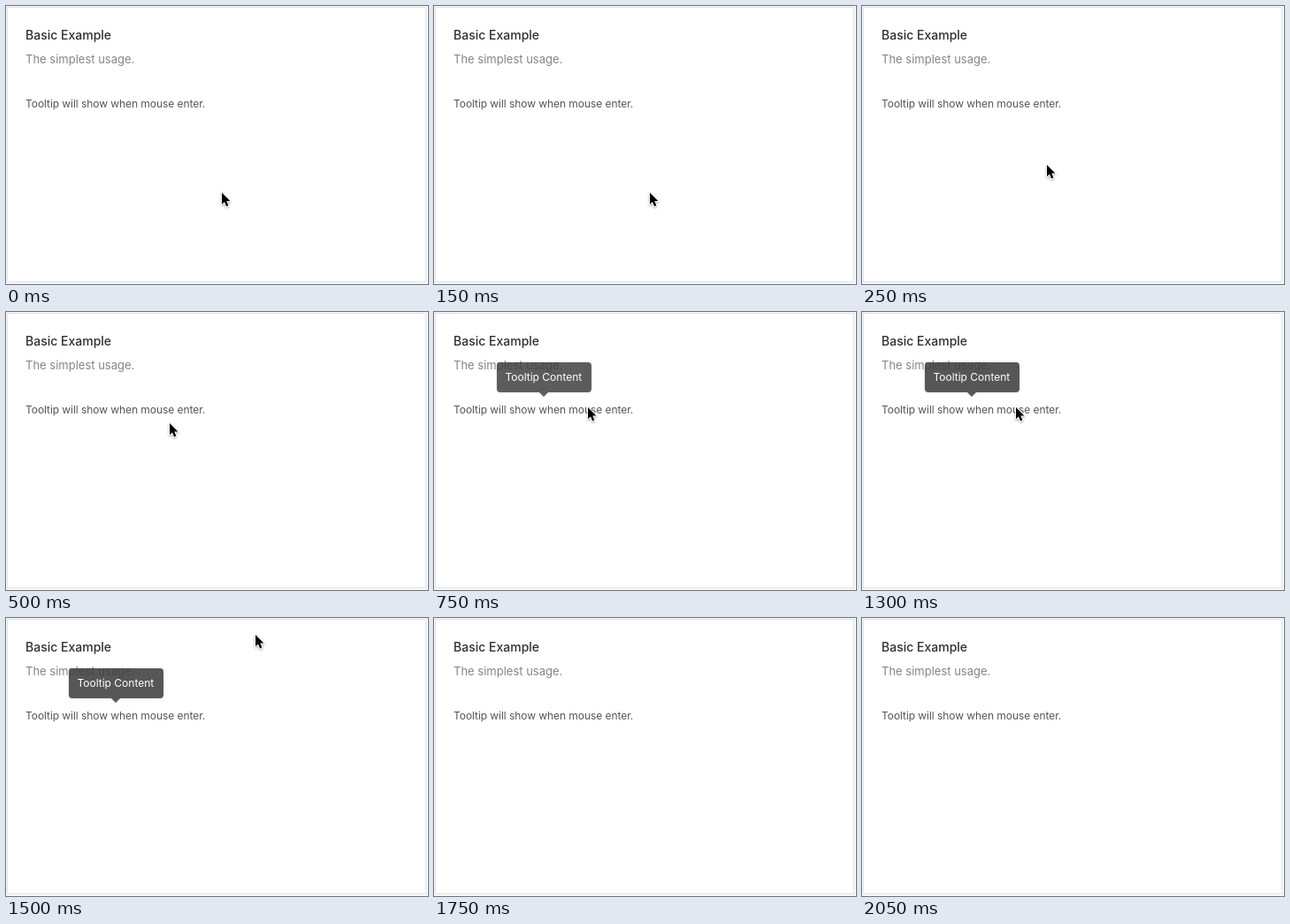
An HTML page for the animation above (2.25 s loop, 477 by 315 pixels).

```html
<!DOCTYPE html>
<html lang="en">
<head>
<meta charset="utf-8">
<title>Tooltip demo</title>
<style>
  html, body { margin: 0; width: 100%; height: 100%; overflow: hidden; background: #fff; }
  svg { display: block; width: 477px; height: 315px; }
  text { font-family: Inter, Roboto, "Liberation Sans", sans-serif; font-size: 12px; }
  .page { fill: #f9f9f9; }
  .card { fill: #fff; stroke: #e3e3e3; }
  .title { font-size: 14px; font-weight: 500; fill: #2e2e2e; }
  .sub { font-size: 13px; fill: #858585; }
  .body { fill: #555; letter-spacing: -0.06px; }
  .bubble { fill: rgba(64, 64, 64, .86); }
  .label { fill: #fff; }
  #tip { filter: drop-shadow(0 0 1.5px rgba(0, 0, 0, .17)); }
  #cursor { filter: drop-shadow(0 1px 1px rgba(0, 0, 0, .35)); }
  #cursor path { fill: #000; stroke: #fff; stroke-width: 2; stroke-linejoin: round; paint-order: stroke; }
</style>
</head>
<body>
<svg viewBox="0 0 477 315">
  <rect class="page" width="477" height="315"/>
  <rect class="card" x="1.5" y="1.5" width="473" height="311"/>
  <text class="title" x="22" y="38">Basic Example</text>
  <text class="sub" x="22" y="65">The simplest usage.</text>
  <text class="body" x="22" y="115">Tooltip will show when mouse enter.</text>
  <g id="tip">
    <path class="bubble" d="M75 57h99a4 4 0 0 1 4 4v26a4 4 0 0 1-4 4H129l-5 5-5-5H75a4 4 0 0 1-4-4V61a4 4 0 0 1 4-4z"/>
    <text class="label" x="80.5" y="78">Tooltip Content</text>
  </g>
  <g id="cursor"><path d="M0 0V13.3L3 10.5L5.1 15.6L7.4 14.6L5.3 9.6H9.4Z"/></g>
</svg>
<script>
  const LOOP = 2250;
  // at: ms, pos: cursor tip (null = hidden), tip: tooltip opacity
  const steps = [
    { at: 0, pos: [244, 211.5], tip: 0 },
    { at: 250, pos: [209, 180], tip: 0 },
    { at: 500, pos: [185, 126], tip: 0 },
    { at: 750, pos: [174, 108], tip: 0.96 },
    { at: 1000, pos: [174, 108], tip: 1 },
    { at: 1500, pos: [282, 19], tip: 1 },
    { at: 1750, pos: null, tip: 0 }
  ];
  const tip = document.getElementById("tip");
  const cursor = document.getElementById("cursor");
  const start = performance.now();

  function draw() {
    const time = (performance.now() - start) % LOOP;
    const step = steps.findLast(s => s.at <= time);
    tip.setAttribute("opacity", step.tip);
    cursor.setAttribute("visibility", step.pos ? "visible" : "hidden");
    if (step.pos) cursor.setAttribute("transform", `translate(${step.pos})`);
    requestAnimationFrame(draw);
  }
  draw();
</script>
</body>
</html>
```
